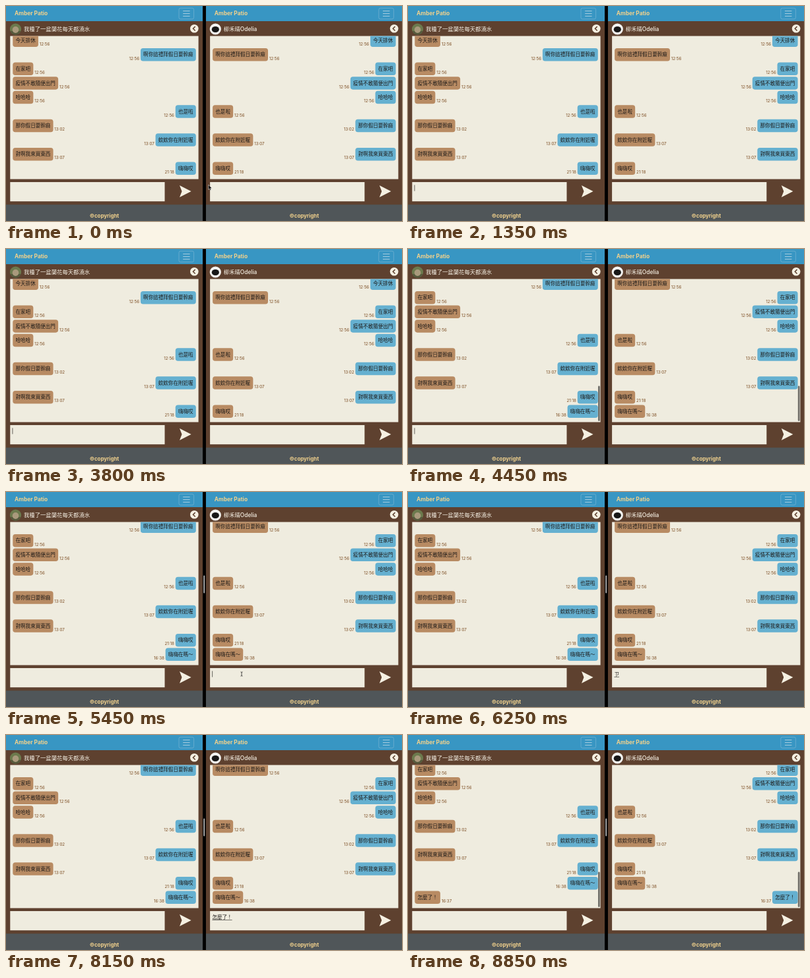
Write an HTML page that moves like this. It is 600 px wide and 326 px high and loops after 8.9 s.

```html
<!DOCTYPE html>
<html lang="zh-Hant">
<head>
<meta charset="utf-8">
<title>Chat demo</title>
<style>
html, body { margin: 0; width: 100%; height: 100%; overflow: hidden; background: #000; }
svg { display: block; width: 600px; height: 326px; }
text { font-family: Inter, "Noto Sans CJK TC", "Noto Sans CJK", sans-serif; white-space: pre; }
.msg { font-size: 7.55px; fill: #1d1a18; }
.time { font-size: 6.2px; fill: #7b4b20; }
.name { font-size: 8.35px; font-weight: 500; fill: #f7f2e6; }
.gold { fill: #f1d18c; font-weight: 700; }
</style>
</head>
<body>
<svg id="stage" viewBox="0 0 600 326">
  <defs>
    <clipPath id="log"><rect x="6.3" y="45.5" width="285.3" height="217"/></clipPath>
    <clipPath id="round"><circle cx="14.5" cy="35" r="8.6"/></clipPath>
  </defs>
</svg>
<script>
const LOOP = 8900, ROW = 21.56, FIRST = 52.2, EM = 7.55, SHIFT = 302.8;
const CREAM = '#efecdf', BROWN = '#5e412f';
const SENT = 3900, REPLIED = 8300;

// [text, time, written by the left user]
const messages = [
  ['今天排休', '12:56', 0],
  ['啊你這禮拜假日要幹麻', '12:56', 1],
  ['在家吧', '12:56', 0],
  ['疫情不敢隨便出門', '12:56', 0],
  ['哈哈哈', '12:56', 0],
  ['也是啦', '12:56', 1],
  ['那你假日要幹麻', '13:02', 0],
  ['欸欸你在附近喔', '13:07', 1],
  ['對啊我來買東西', '13:07', 0],
  ['嗨嗨哎', '21:18', 1],
  ['嗨嗨在嗎～', '16:38', 1],
  ['怎麼了！', '16:37', 0]
];

// [start ms, input content]
const typing = [
  [[1450, 'ㄏ'], [1550, 'ㄏㄞ'], [1650, '嗨'], [1750, '嗨ㄏ'], [1850, '嗨ㄏㄞ'],
   [1950, '嗨嗨'], [2050, '嗨嗨ㄗ'], [2130, '嗨嗨ㄗㄞ'], [2220, '嗨嗨在'],
   [2450, '嗨嗨在ㄇ'], [2600, '嗨嗨在ㄇㄚ'], [2750, '嗨嗨在嗎'], [3200, '嗨嗨在嗎～'], [3700, '']],
  [[6200, 'ㄗ'], [6400, 'ㄗㄣ'], [6600, '怎'], [6800, '怎ㄇ'], [6950, '怎ㄇㄜ'],
   [7150, '怎麼'], [7300, '怎麼ㄌ'], [7450, '怎麼ㄌㄜ'], [7600, '怎麼了'], [7850, '怎麼了！'], [8200, '']]
];
const focus = [[1000, 4900], [5350, 8250]];

// [ms, x, y]
const path = [[0, 306.7, 271], [150, 306.7, 271], [750, 62, 276], [1300, 62, 276],
  [4500, 62, 276], [4700, 110, 268], [5300, 357, 276], [6100, 357, 276]];

const stage = document.getElementById('stage');

function add(parent, tag, attrs, content) {
  const el = document.createElementNS('http://www.w3.org/2000/svg', tag);
  for (const k in attrs) el.setAttribute(k, attrs[k]);
  if (content !== undefined) el.textContent = content;
  parent.appendChild(el);
  return el;
}
const rect = (p, x, y, width, height, fill, rx = 0) => add(p, 'rect', { x, y, width, height, fill, rx });
const label = (p, cls, x, y, s, more) => add(p, 'text', { class: cls, x, y, ...more }, s);
const show = (el, on) => el.setAttribute('visibility', on ? 'visible' : 'hidden');

function addMessage(parent, [text, time, byLeft], row, side) {
  const own = byLeft !== side;
  const y = FIRST + row * ROW, w = text.length * EM + 8.4;
  const x = own ? 287.8 - w : 10.3;
  const g = add(parent, 'g', {});
  rect(g, x, y - 9.75, w, 19.5, own ? '#65b0d0' : '#b88b63', 3.8);
  label(g, 'msg', x + 4.2, y + 2.7, text);
  label(g, 'time', own ? x - 1.8 : x + w + 1.8, y + 7.8, time, { 'text-anchor': own ? 'end' : 'start' });
  return g;
}

function addAvatar(p, side) {
  const g = add(p, 'g', { 'clip-path': 'url(#round)' });
  if (side) {
    rect(g, 5, 26, 19, 19, '#f4f4f1');
    add(g, 'ellipse', { cx: 14.5, cy: 35.5, rx: 5.6, ry: 4.6, fill: '#171717' });
  } else {
    rect(g, 5, 26, 19, 19, '#6c7a4d');
    rect(g, 5, 38, 19, 8, '#55593c');
    add(g, 'ellipse', { cx: 14.5, cy: 36, rx: 4.8, ry: 5, fill: '#a99a7c' });
  }
}

function makePanel(side) {
  const p = add(stage, 'g', { transform: `translate(${side * SHIFT})` });
  rect(p, 0, 0, 298, 326, BROWN);
  rect(p, 0, 0, 298, 23, '#3896c3');
  label(p, 'gold', 13, 14.2, 'Amber Patio', { 'font-size': 8.4 });
  add(p, 'rect', { x: 262, y: 3.2, width: 22.6, height: 16.6, rx: 2.4, fill: 'none', stroke: '#79b5d3', 'stroke-width': .7 });
  add(p, 'path', { d: 'M268.2 7.6h10.4m-10.4 3.9h10.4m-10.4 3.9h10.4', stroke: '#b3d3e3', 'stroke-width': .9 });

  addAvatar(p, side);
  label(p, 'name', 27, 38.2, side ? '柳禾晴Odelia' : '我種了一盆蘭花每天都澆水');
  add(p, 'circle', { cx: 285.3, cy: 34.3, r: 6.3, fill: '#f5f0e2' });
  add(p, 'path', { d: 'M286.7 31.1l-3.2 3.2 3.2 3.2', fill: 'none', stroke: BROWN, 'stroke-width': 1.5 });

  rect(p, 6.3, 45.5, 285.3, 217, CREAM);
  const log = add(p, 'g', { 'clip-path': 'url(#log)' });
  const list = add(log, 'g', {});
  const rows = messages.map((m, i) => addMessage(list, m, i, side));
  const bar = rect(p, 288, 207.5, 2.8, 53.5, '#72706a', 1.4);

  rect(p, 6.3, 267, 234.2, 29.2, CREAM);
  add(p, 'path', { d: 'M263 272l17.6 9-17.6 9 3.5-9z', fill: '#f5f0e2' });
  const input = label(p, 'msg', 9.6, 278.6, '');
  const line = rect(p, 9.6, 280.2, 0, .6, '#2a2724');
  const caret = rect(p, 9.6, 271.4, .7, 9.2, '#2a2724');

  rect(p, 0, 301.2, 298, 25, '#505659');
  label(p, 'gold', 149, 320.6, '©copyright', { 'font-size': 7.9, 'text-anchor': 'middle' });
  return { list, rows, bar, input, line, caret };
}

const panels = [makePanel(0), makePanel(1)];
rect(stage, 298, 0, 4.8, 326, '#000');
const handle = rect(stage, 299.2, 126.5, 2, 27, '#a9a9a9', 1);
const arrow = add(stage, 'path', { d: 'M0 0v7.4l1.7-1.5 1.1 2.5 1.3-.6-1.1-2.4h2.3z', fill: '#000', stroke: '#fff', 'stroke-width': .5 });
const beam = add(stage, 'path', { d: 'M-1.5-3.2q1.5 0 1.5 1v4.4q0 1-1.5 1M1.5-3.2q-1.5 0-1.5 1m0 4.4q0 1 1.5 1', fill: 'none', stroke: '#222', 'stroke-width': .8 });

function pointerAt(t) {
  const i = path.findIndex(k => k[0] > t);
  if (i < 1) return path[path.length - 1].slice(1);
  const [t0, x0, y0] = path[i - 1], [t1, x1, y1] = path[i];
  const u = (t - t0) / (t1 - t0), e = u * u * (3 - 2 * u);
  return [x0 + (x1 - x0) * e, y0 + (y1 - y0) * e];
}

function drawPointer(t) {
  const [x, y] = pointerAt(t);
  const on = t < 1300 || (t >= 4500 && t < 6100);
  const inside = y > 267 && [0, SHIFT].some(o => x > o + 6.3 && x < o + 240.5);
  for (const el of [arrow, beam]) el.setAttribute('transform', `translate(${x} ${y})`);
  show(arrow, on && !inside);
  show(beam, on && inside);
}

function barOpacity(t) {
  const age = t - (t >= REPLIED ? REPLIED : SENT);
  return age < 0 ? 0 : Math.max(0, Math.min(1, (950 - age) / 250));
}

function drawPanel(p, side, t) {
  const extra = (t >= SENT) + (t >= REPLIED);
  p.list.setAttribute('transform', `translate(0 ${-extra * ROW})`);
  p.rows.forEach((row, i) => show(row, i < 10 + extra));
  p.bar.setAttribute('opacity', barOpacity(t));

  const step = typing[side].filter(k => k[0] <= t).pop();
  const text = step ? step[1] : '';
  if (p.input.textContent !== text) p.input.textContent = text;
  const w = text.length * EM;
  p.line.setAttribute('width', w);
  p.caret.setAttribute('x', 9.6 + w);
  const [from, to] = focus[side];
  const blink = side ? (t - from) % 1000 < 600 : (t - from) % 1000 < 900;
  show(p.caret, t >= from && t < to && blink);
}

function draw(t) {
  panels.forEach((p, side) => drawPanel(p, side, t));
  show(handle, t >= 4950);
  drawPointer(t);
}

const start = performance.now();
function tick(now) {
  draw(Math.max(0, now - start) % LOOP);
  requestAnimationFrame(tick);
}
draw(0);
requestAnimationFrame(tick);
</script>
</body>
</html>
```
